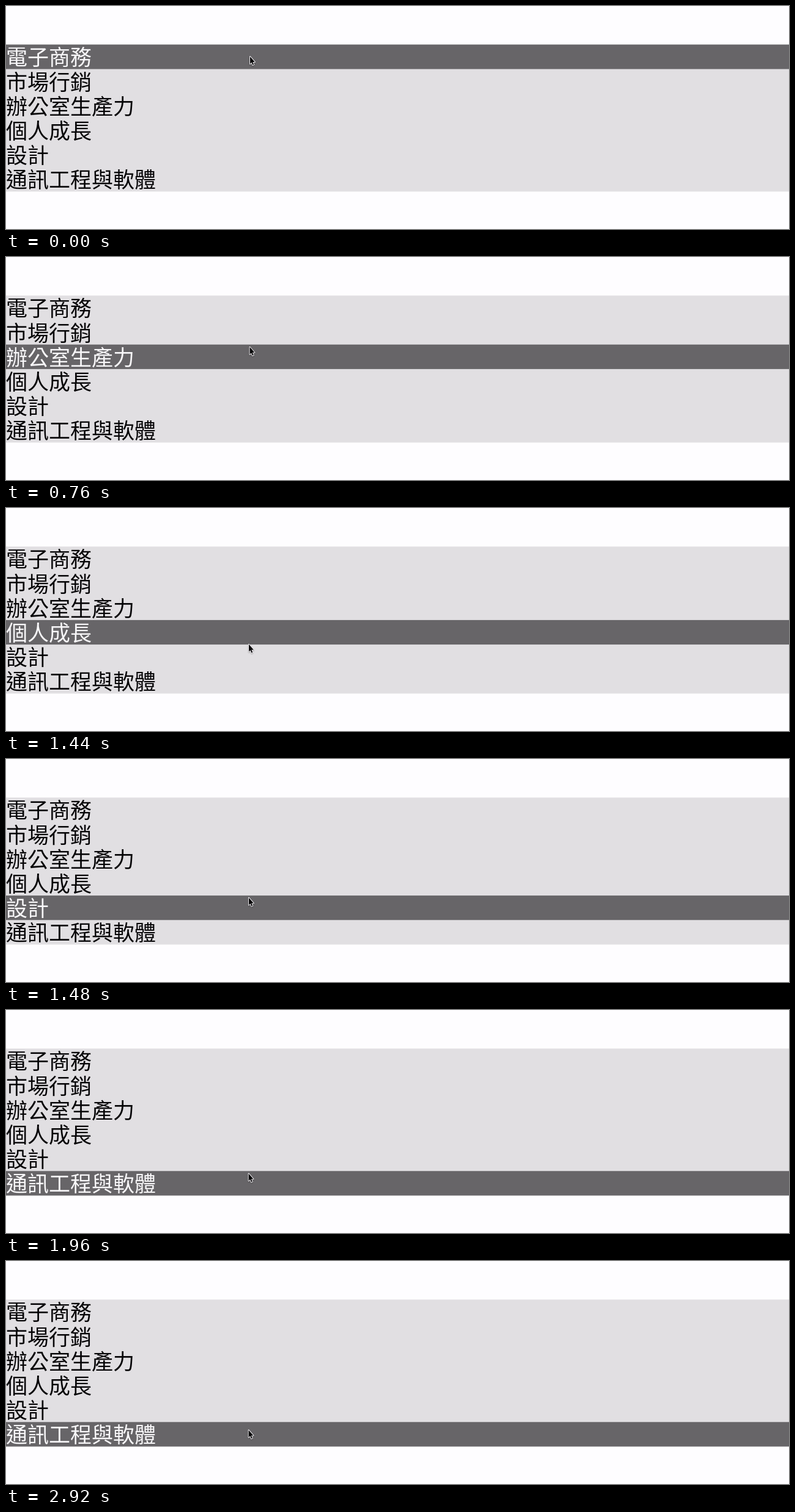
These frames come from a looping animation (1280x366 px, 3 s). An HTML page with a canvas:

```html
<!DOCTYPE html>
<html lang="zh-Hant">
<head>
<meta charset="utf-8">
<style>
  html, body { margin: 0; width: 100%; height: 100%; overflow: hidden; background: #fefdff; }
  canvas { display: block; }
</style>
</head>
<body>
<canvas width="1280" height="366"></canvas>
<script>
const ctx = document.querySelector('canvas').getContext('2d');
const labels = ['電子商務', '市場行銷', '辦公室生產力', '個人成長', '設計', '通訊工程與軟體'];
const LOOP = 3000, STEP = 40, TOP = 63.3, ROW = 40.2, HOVER_LAG = 2;

// Pointer tip as [time, x, y]
const path = [
  [40, 398, 82], [400, 398, 106], [1080, 397, 185], [1460, 396, 224.75],
  [1960, 395.6, 267.5], [2320, 395.6, 275.5], [2920, 395.6, 276.5]
];
const arrow = new Path2D('M1 1V13L3.5 10.6L5.4 15L7.1 14.2L5.3 10H8.8Z');

function slope(i, axis) {
  if (i === 0 || i === path.length - 1) return 0;
  const a = path[i - 1], b = path[i + 1];
  return (b[axis] - a[axis]) / (b[0] - a[0]);
}

// Cubic Hermite interpolation along the path
function pointer(time, axis) {
  const last = path.length - 1;
  if (time <= path[0][0]) return path[0][axis];
  if (time >= path[last][0]) return path[last][axis];
  const i = path.findIndex(p => p[0] > time) - 1;
  const a = path[i], b = path[i + 1], span = b[0] - a[0];
  const u = (time - a[0]) / span, v = 1 - u;
  return v * v * (1 + 2 * u) * a[axis] + u * u * (1 + 2 * v) * b[axis]
    + span * u * v * (v * slope(i, axis) - u * slope(i + 1, axis));
}

function drawMenu(active) {
  ctx.fillStyle = '#e1dfe2';
  ctx.fillRect(0, TOP, 1280, ROW * labels.length);
  ctx.fillStyle = '#676568';
  ctx.fillRect(0, TOP + active * ROW, 1280, ROW);
  ctx.font = '35px "Noto Sans CJK TC", "Noto Sans CJK", sans-serif';
  labels.forEach((label, i) => {
    ctx.fillStyle = i === active ? '#f8f7f9' : '#050406';
    ctx.fillText(label, 0, TOP + i * ROW + 34);
  });
}

function drawPointer(x, y) {
  ctx.save();
  ctx.translate(x, y);
  ctx.lineWidth = 2;
  ctx.lineJoin = 'round';
  ctx.strokeStyle = '#eeecef';
  ctx.shadowColor = 'rgba(0, 0, 0, .3)';
  ctx.shadowBlur = 2;
  ctx.shadowOffsetY = 1;
  ctx.stroke(arrow);
  ctx.shadowColor = 'transparent';
  ctx.fillStyle = '#050406';
  ctx.fill(arrow);
  ctx.restore();
}

function draw(now) {
  const time = Math.floor(now % LOOP / STEP) * STEP;
  const x = pointer(time, 1), y = pointer(time, 2);
  ctx.fillStyle = '#fefdff';
  ctx.fillRect(0, 0, 1280, 366);
  drawMenu(Math.floor((y - TOP - HOVER_LAG) / ROW));
  drawPointer(x, y);
  requestAnimationFrame(draw);
}
requestAnimationFrame(draw);
</script>
</body>
</html>
```
